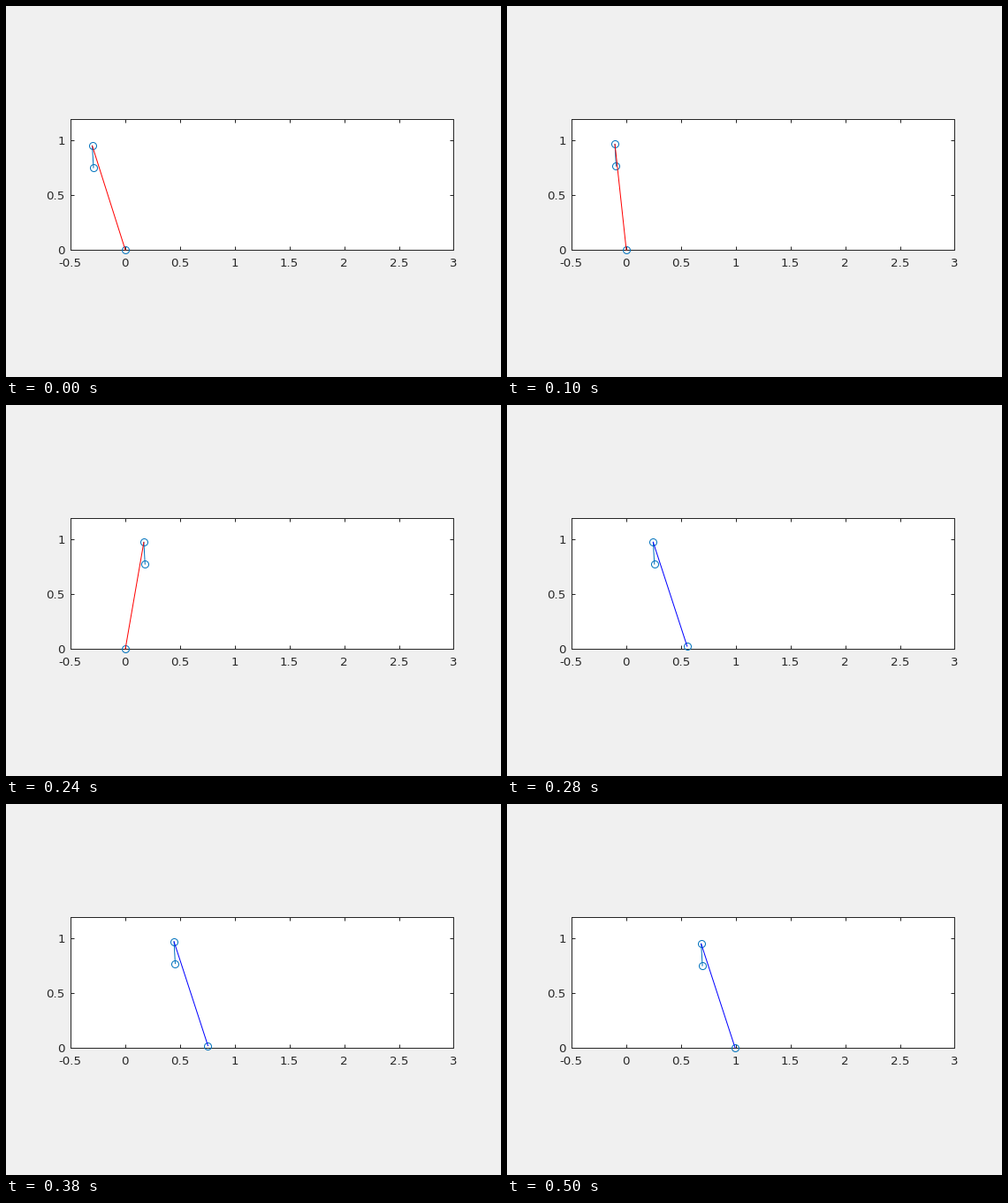
A matplotlib script that plays this animation: 560 px wide and 420 px high, repeating every 520 ms.

```python
import numpy as np
import matplotlib.pyplot as plt
from matplotlib.animation import FuncAnimation

W, H, DPI = 560, 420, 100
FRAMES, STEP = 26, 20
LIFTOFF = 14
X0, Y0, SCALE = 135.0, 276.2, 123.82
INK, BLUE = "#262626", "#0072BD"
LINE = 72 / DPI  # one pixel in points

fig = plt.figure(figsize=(W / DPI, H / DPI), dpi=DPI, facecolor="#F0F0F0")
ax = fig.add_axes([0, 0, 1, 1])
ax.set_xlim(0, W)
ax.set_ylim(H, 0)
ax.axis("off")


def px(x):
    return X0 + SCALE * np.asarray(x)


def py(y):
    return Y0 - SCALE * np.asarray(y)


def rule(xs, ys):
    ax.plot(xs, ys, color=INK, lw=LINE, snap=True, zorder=2,
            solid_capstyle="butt", solid_joinstyle="miter")


def label(x, y, text, ha):
    ax.text(x, y, text, ha=ha, va="baseline", color=INK,
            family="DejaVu Sans", size=13.33 * LINE)


def draw_axes():
    # Rules snap to the centre of the pixel that starts at each value.
    left, right, top, bottom = 73, 506, 128, 276
    tick = 4.4
    ax.fill([left, right, right, left], [top, top, bottom, bottom],
            color="white", lw=0, zorder=1)
    rule([left, right, right, left, left], [top, top, bottom, bottom, top])
    for v in np.arange(-0.5, 3.1, 0.5):
        x = px(v)
        rule([x, x], [bottom, bottom - tick])
        rule([x, x], [top, top + tick])
        label(x - 0.3, 295, f"{v:g}", "center")
    for v in (0, 0.5, 1):
        y = py(v)
        rule([left, left + tick], [y, y])
        rule([right, right - tick], [y, y])
        label(66.7, y + 5, f"{v:g}", "right")


draw_axes()
body, = ax.plot([], [], color=BLUE, lw=LINE, zorder=3)
joints, = ax.plot([], [], "o", mfc="none", mec=BLUE, mew=LINE,
                  ms=8 * LINE, snap=False, zorder=4)
leg, = ax.plot([], [], lw=LINE, zorder=5)


def hip_at(k):
    x = np.interp(k, [0, 9, LIFTOFF, 25], [-0.302, 0.054, 0.2455, 0.684])
    span = LIFTOFF if k < LIFTOFF else 25 - LIFTOFF
    y = 0.976 - 0.024 * (abs(k - LIFTOFF) / span) ** 2.2
    return x, y


def draw(k):
    x, y = hip_at(k)
    stance = k < LIFTOFF
    # The foot is planted in stance and held at a fixed angle in flight.
    foot = (0, 0) if stance else (x + 0.31, y - 0.951)
    tail = (x + 0.011, y - 0.2)
    body.set_data(px([x, tail[0]]), py([y, tail[1]]))
    leg.set_data(px([x, foot[0]]), py([y, foot[1]]))
    leg.set_color("red" if stance else "blue")
    joints.set_data(px([x, tail[0], foot[0]]), py([y, tail[1], foot[1]]))
    return body, joints, leg


anim = FuncAnimation(fig, draw, frames=FRAMES, interval=STEP,
                     repeat=True, repeat_delay=0)
plt.show()
```
